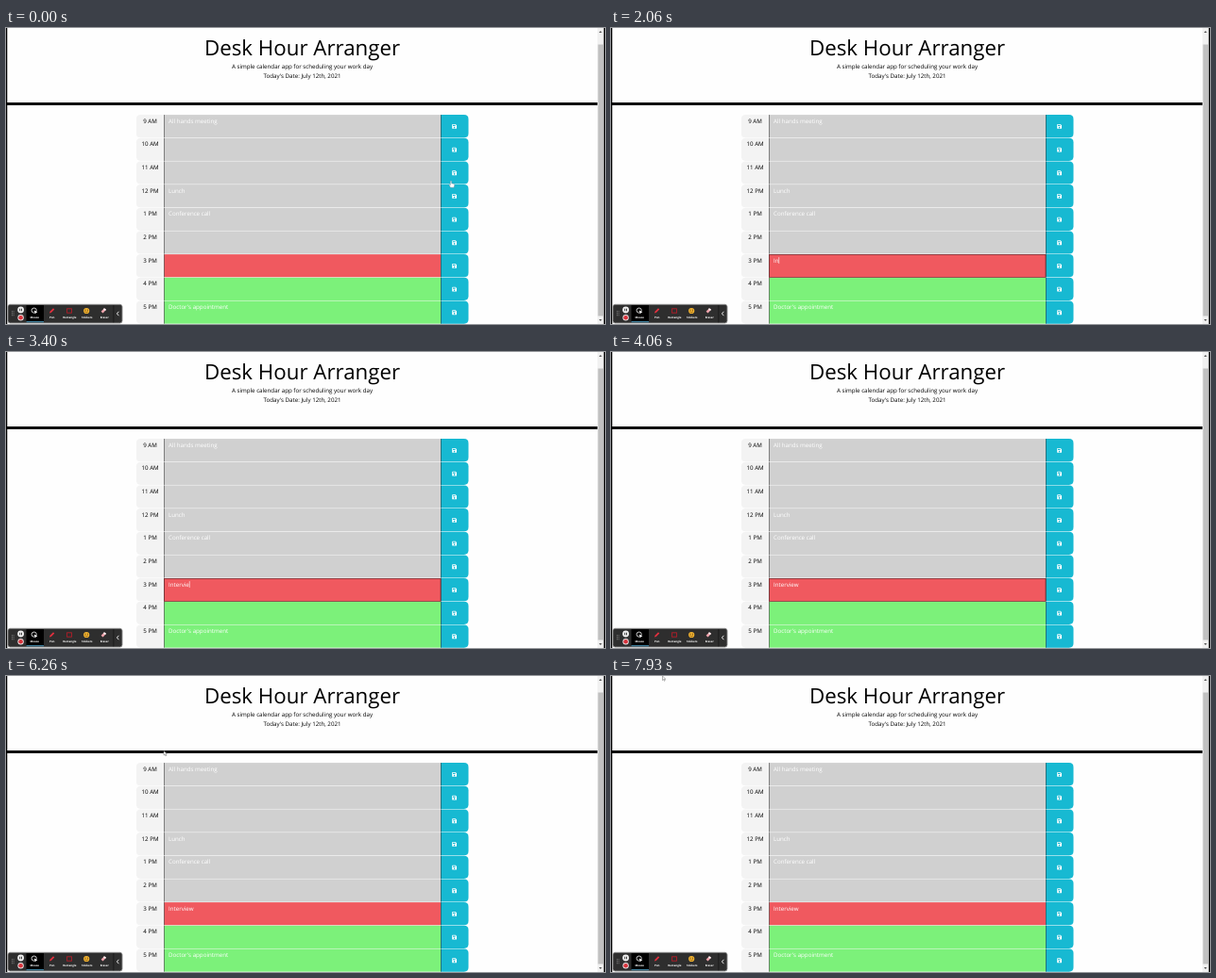
Write an HTML page that moves like this. It is 634x314 px and loops after 8000 ms.

```html
<!DOCTYPE html>
<html lang="en">
<head>
<meta charset="utf-8">
<title>Day planner</title>
<style>
  html, body { margin: 0; width: 100%; height: 100%; overflow: hidden; background: #fefefe; }
  svg { display: block; width: 634px; height: 314px; }
  text { font: 6.2px "Open Sans", sans-serif; text-rendering: geometricPrecision; }
  .mid { text-anchor: middle; }
  .title { font-size: 22.3px; }
  .entry { fill: #fff; }
  .tool { font: 700 2.9px "Open Sans", sans-serif; fill: #fff; text-anchor: middle; }
</style>
</head>
<body>
<svg id="stage" viewBox="0 0 634 314"></svg>
<script>
const LOOP = 8000, TOP = 92.1, ROW = 24.67, NOW = 6;
const LEFT = 137.9, SIDE = 29.3, FIELD = 167.2, SAVE = 460.2;
const hours = ["9 AM", "10 AM", "11 AM", "12 PM", "1 PM", "2 PM", "3 PM", "4 PM", "5 PM"];
const entries = { 0: "All hands meeting", 3: "Lunch", 4: "Conference call", 8: "Doctor's appointment" };
const word = "Interview";
const keyTimes = [1730, 1960, 2170, 2380, 2600, 2860, 3060, 3290, 3500];
const focusAt = 680, blurAt = 5000;
// Pointer stops: time, x, y
const stops = [
  [0, 471, 162], [60, 471, 162], [660, 400, 252], [4600, 400, 252],
  [4960, 475, 254], [5780, 475, 254], [6260, 167, 79.5], [6360, 167, 79.5],
  [6660, 54.5, 0], [LOOP, 54.5, 0]
];
const $ = id => document.getElementById(id);

const rect = (x, y, w, h, fill, extra = "") =>
  `<rect x="${x}" y="${y}" width="${w}" height="${h}" fill="${fill}" ${extra}/>`;
const text = (x, y, cls, str, id = "") => `<text x="${x}" y="${y}" class="${cls}" id="${id}">${str}</text>`;
const path = (d, fill, extra = "") => `<path d="${d}" fill="${fill}" ${extra}/>`;

function row(i) {
  const y = TOP + i * ROW, h = ROW - 0.5, r = 4.6;
  const fill = i < NOW ? "#d0d0d0" : i === NOW ? "#f0595f" : "#7cf17a";
  // Rounded end cap, extending by w (negative goes left)
  const cap = (x, w, color) => {
    const s = Math.sign(w) * r;
    return path(`M${x} ${y}h${w - s}q${s} 0 ${s} ${r}v${h - 2 * r}q0 ${r} ${-s} ${r}H${x}z`, color);
  };
  return cap(FIELD, -SIDE, "#f3f3f3") +
    rect(FIELD, y, SAVE - FIELD, h, fill) +
    cap(SAVE, SIDE, "#17b9d2") +
    rect(167, y, 0.6, h, "#444") + rect(460, y, 0.6, h, "#123c44") +
    text(LEFT + SIDE / 2, y + 8.7, "mid", hours[i]) +
    text(172, y + 8.7, "entry", entries[i] || "", "entry" + i) +
    `<g id="icon${i}" transform="translate(472.2 ${y + 9.9})" fill="#fff">` +
    path("M.5 0H3.6L4.8 1.2V4.3q0 .5-.5.5H.5q-.5 0-.5-.5V.5Q0 0 .5 0zM.8.8v1.2h2.6V.8zM2.4 2.7a.75.75 0 1 0 .01 0z",
      "inherit", 'fill-rule="evenodd"') + "</g>";
}

function toolbar() {
  const names = ["Mouse", "Pen", "Rectangle", "Stickers", "Eraser"];
  let s = rect(2, 293.3, 121, 19.7, "#2e2e2e", 'rx="2.5" stroke="#8c8c8c" stroke-width=".9"') +
    rect(21.5, 294, 18.5, 18, "#000") + rect(21.5, 311.2, 18.5, 1, "#4d9fc4") +
    rect(113.6, 294, 0.6, 18.4, "#111");
  for (let k = 0; k < 6; k++)
    s += rect(6 + (k % 2) * 1.7, 300.4 + (k >> 1) * 2, 0.8, 0.8, "#aaa");
  s += '<circle cx="15.6" cy="299" r="3.4" fill="#eee"/>' + rect(14.3, 297.7, 0.9, 2.6, "#333") +
    rect(16, 297.7, 0.9, 2.6, "#333") +
    '<circle cx="15.6" cy="307.2" r="3.2" fill="#e8e0e0"/><circle cx="15.6" cy="307.2" r="2.3" fill="#d8333c"/>' +
    '<circle cx="29.7" cy="299.6" r="2.6" fill="none" stroke="#fff" stroke-width=".8"/>' +
    path("M29.8 299.4l3.6 2.2-1.6.3-.8 1.5z", "#fff") +
    path("M46 302.6l.5-1.9 3.5-3.4 1.3 1.3-3.5 3.5z", "#e2313f") +
    rect(64.6, 297.8, 4.8, 4.4, "none", 'stroke="#b51d28" stroke-width=".9"') +
    '<circle cx="85.2" cy="300" r="3.1" fill="#f6b630"/>' +
    rect(83.6, 298.7, 1, 1, "#5a3a10") + rect(85.9, 298.7, 1, 1, "#5a3a10") +
    path("M83.4 300.8q1.8 1.8 3.6 0", "none", 'stroke="#5a3a10" stroke-width=".6"') +
    path("M100.6 300.8l3.4-3.6 2 1.6-3.4 3.6z", "#f2a5ae") + path("M103 298.3l1-1.1 2 1.6-1 1.1z", "#fff") +
    path("M119.4 300.8l-2 2.2 2 2.2", "none", 'stroke="#fff" stroke-width=".9"');
  return s + names.map((n, i) => text(30.3 + i * 18.5, 308, "tool", n)).join("");
}

$("stage").innerHTML =
  rect(0, 0, 634, 314, "#fefefe") +
  text(313.5, 29.4, "mid title", "Desk Hour Arranger") +
  text(313.5, 42.5, "mid", "A simple calendar app for scheduling your work day") +
  text(313.5, 53.4, "mid", "Today's Date: July 12th, 2021") +
  rect(0, 79, 626, 2.9, "#000") +
  hours.map((_, i) => row(i)).join("") +
  rect(167.5, 240.5, 292.5, 24, "none", 'id="focus" stroke="#7d3236" stroke-width=".8"') +
  rect(0, TOP + NOW * ROW + 3, 0.6, 6.8, "#fff", 'id="caret"') +
  rect(626, 0, 7, 314, "#f1f1f1") + rect(626.6, 17.5, 5.4, 288, "#c1c1c1") +
  path("M627.6 5l1.6-2 1.6 2zM627.6 309l1.6 2 1.6-2z", "#555") +
  rect(0, 0, 1.3, 314, "#000") + rect(632.7, 0, 1.3, 314, "#000") +
  toolbar() +
  '<circle id="ring" r="10" fill="none" stroke="#7c2a4c" stroke-width="1"/>' +
  '<g id="pointer" stroke-width=".5">' +
  path("M0 0v4.6l1.1-1 .8 1.7.8-.4-.8-1.6h1.5z", "#fff", 'id="arrow" stroke="#666"') +
  path("M-.6.6q.6-1 1.2 0v2l2.2.5q.7.2.6 1l-.5 2.4H-.4l-1.6-2.3q.2-.8 1.4 0z", "#fff",
    'id="hand" transform="scale(1.1)" stroke="#567" stroke-width=".3"') +
  path("M-1-3h2M0-3v6M-1 3h2", "none", 'id="beam" stroke="#333"') + "</g>";

const show = (id, on) => $(id).setAttribute("visibility", on ? "visible" : "hidden");

function pointerAt(t) {
  const i = stops.findIndex(s => s[0] > t);
  const [t0, x0, y0] = stops[i - 1], [t1, x1, y1] = stops[i];
  const p = (t - t0) / (t1 - t0), e = p * p * (3 - 2 * p);
  return [x0 + (x1 - x0) * e, y0 + (y1 - y0) * e];
}

function draw(t) {
  const pressed = keyTimes.filter(k => k <= t);
  const entry = $("entry" + NOW);
  entry.textContent = word.slice(0, pressed.length);

  const focused = t >= focusAt && t < blurAt;
  const blinkStart = pressed.length ? pressed[pressed.length - 1] : focusAt;
  show("focus", focused);
  show("caret", focused && Math.floor((t - blinkStart) / 520) % 2 === 0);
  $("caret").setAttribute("x", 172 + (pressed.length ? entry.getComputedTextLength() : 0));

  const [x, y] = pointerAt(t);
  const inRows = y > TOP, shown = t < 820 || t >= 4600;
  const kind = inRows && x >= SAVE && x < SAVE + SIDE ? "hand" : inRows && x >= FIELD && x < SAVE ? "beam" : "arrow";
  for (const k of ["arrow", "hand", "beam"]) show(k, shown && k === kind);
  $("pointer").setAttribute("transform", `translate(${x} ${y})`);
  hours.forEach((_, i) => {
    const over = shown && Math.abs(x - 474.6) < 3 && Math.abs(y - TOP - i * ROW - 12.3) < 3;
    $("icon" + i).setAttribute("fill", over ? "#1c2b33" : "#fff");
  });

  $("ring").setAttribute("cx", x);
  $("ring").setAttribute("cy", y);
  show("ring", (t >= 660 && t < 820) || (t >= 4960 && t < 5260));
}

const start = performance.now();
function tick() {
  draw((performance.now() - start) % LOOP);
  requestAnimationFrame(tick);
}
tick();
</script>
</body>
</html>
```
